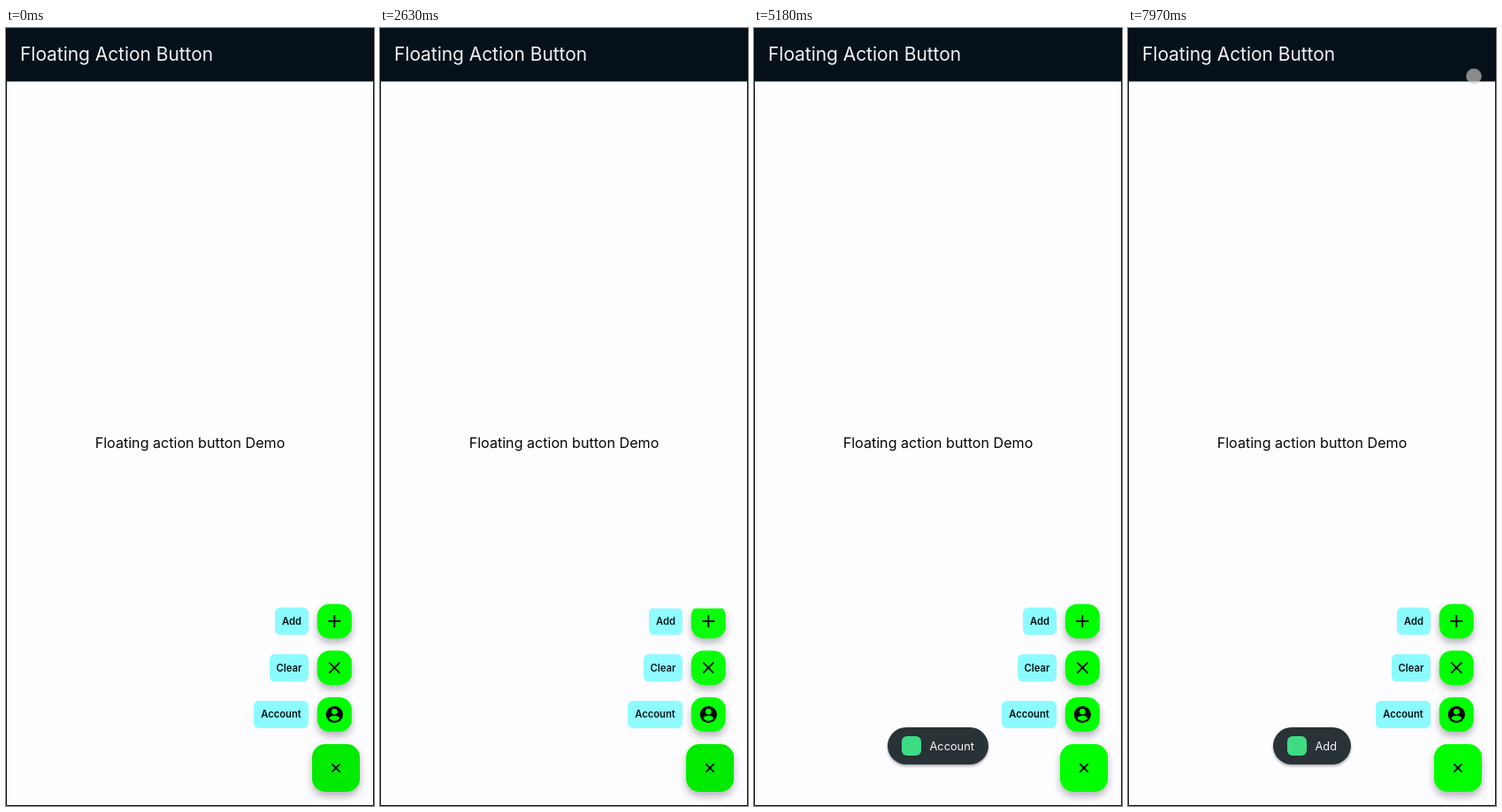
An HTML page that plays this animation: 416x880 px, repeating every 7990 ms.

```html
<!DOCTYPE html>
<html lang="en">
<head>
<meta charset="utf-8">
<title>Floating Action Button</title>
<style>
  html, body { margin: 0; width: 100%; height: 100%; overflow: hidden; background: #fdfcff; }
  svg { display: block; font-family: Inter, sans-serif; }
  .chip { fill: #8cfbff; }
  .chip-text { font-size: 11.2px; font-weight: 600; text-anchor: middle; fill: #001214; }
  .button { fill: #0f0; filter: drop-shadow(0 5px 4px rgba(50, 50, 60, .35)); }
  .line { stroke: #000; stroke-width: 1.8; fill: none; }
  .ripple { fill: #000; opacity: 0; }
  .toast-body { fill: #293237; filter: drop-shadow(0 2px 1.5px rgba(50, 50, 60, .4)); }
</style>
</head>
<body>
<svg width="416" height="880" viewBox="0 0 416 880">
  <clipPath id="reveal"><rect id="revealBox" x="0" width="416"/></clipPath>
  <rect width="416" height="880" fill="#fdfcff"/>
  <text x="208" y="475" font-size="16.1" text-anchor="middle" fill="#060608">Floating action button Demo</text>
  <rect width="416" height="60.5" fill="#07111a"/>
  <text x="16" y="37" font-size="20.9" fill="#f2f3f6">Floating Action Button</text>
  <path d="M.5 0V879.5H415.5V0" fill="none" stroke="#080c10"/>

  <g clip-path="url(#reveal)"><g id="menu"></g></g>

  <g transform="translate(373 837)">
    <rect class="button" x="-27" y="-27" width="54" height="54" rx="15"/>
    <rect class="ripple" id="rippleFab" x="-27" y="-27" width="54" height="54" rx="15"/>
    <path class="line" id="fabIcon" d="M-6.5 0H6.5M0-6.5V6.5"/>
  </g>

  <g id="toasts"></g>
  <circle id="touch" r="8.5" fill="#d6d6d6" stroke="#b0b0b0" stroke-width=".8"/>
</svg>

<script>
const LOOP = 7990;
const $ = id => document.getElementById(id);
const clamp = v => Math.min(1, Math.max(0, v));
const ramp = (t, start, length) => clamp((t - start) / length);

const icons = {
  Add: '<path class="line" d="M-7 0H7M0-7V7"/>',
  Clear: '<path class="line" d="M-6-6L6 6M6-6L-6 6"/>',
  Account: `<circle r="9.6"/><circle cy="-3.2" r="3.3" fill="#0f0"/>
    <path d="M-5.8 4Q-4.5 1.2 0 1.2T5.8 4Q3.6 7.2 0 7.2T-5.8 4Z" fill="#0f0"/>`
};

// Menu rows: name, centre y, left edge of the label chip
[['Add', 671, 304], ['Clear', 723.7, 298], ['Account', 776.5, 280]].forEach(([name, y, left]) => {
  const box = 'x="-19.5" y="-19.5" width="39" height="39" rx="14"';
  $('menu').innerHTML += `
    <rect class="chip" x="${left}" y="${y - 15.5}" width="${342 - left}" height="31" rx="6"/>
    <text class="chip-text" x="${(left + 342) / 2}" y="${y + 3.8}">${name}</text>
    <g transform="translate(371.3 ${y})">
      <rect class="button" ${box}/><rect class="ripple" id="ripple${name}" ${box}/>${icons[name]}
    </g>`;
});

const toasts = [
  { name: 'Account', half: 57, enter: 3390, exit: 5690 },
  { name: 'Add', half: 44, enter: 5960, exit: Infinity }
];
for (const { name, half } of toasts) {
  $('toasts').innerHTML += `
    <g id="toast${name}">
      <rect class="toast-body" x="${-half}" y="-21" width="${2 * half}" height="42" rx="21"/>
      <g id="content${name}">
        <rect x="${16 - half}" y="-11" width="22" height="22" rx="6" fill="#3ddc84"/>
        <text x="${47.5 - half}" y="4.6" font-size="12.8" fill="#f4f4f4">${name}</text>
      </g>
    </g>`;
}

const taps = [
  { button: 'Fab', down: -250, up: -205, x: 385, y: 825 },
  { button: 'Fab', down: 1060, up: 1103, x: 385, y: 825 },
  { button: 'Fab', down: 2320, up: 2363, x: 380, y: 829 },
  { button: 'Account', down: 3130, up: 3280, x: 375, y: 772 },
  { button: 'Add', down: 5530, up: 5640, x: 374, y: 669 },
  { down: 7870, up: 8000, x: 378, y: 54.5, dx: 13 }
];

// Critically damped spring from 0 to 1
function spring(ms, omega) {
  const x = Math.max(0, ms) / 1000 * omega;
  return 1 - (1 + x) * Math.exp(-x);
}

function bezier(x1, y1, x2, y2, x) {
  const at = (a, b, s) => 3 * (1 - s) ** 2 * s * a + 3 * (1 - s) * s * s * b + s ** 3;
  let low = 0, high = 1;
  for (let i = 0; i < 20; i++) {
    const mid = (low + high) / 2;
    if (at(x1, x2, mid) < x) low = mid; else high = mid;
  }
  return at(y1, y2, low);
}

// 1 = menu open, 0 = closed
function openness(t, omega) {
  return t < 2363 ? 1 - spring(t - 1103, omega) : spring(t - 2363, omega);
}

function drawMenu(t) {
  const open = openness(t - 8, 20);
  const height = 159 * open;
  $('menu').setAttribute('opacity', open);
  $('revealBox').setAttribute('y', 810 - height);
  $('revealBox').setAttribute('height', height);
  $('fabIcon').setAttribute('transform', `rotate(${315 * openness(t, 38.7)})`);
}

function drawToast(t, { name, enter, exit }) {
  const grow = bezier(0, 0, .2, 1, ramp(t, enter, 333));
  const shrink = bezier(.3, 0, 1, 1, ramp(t, exit, 250));
  const scale = .9 + .1 * (grow - shrink);
  $('toast' + name).setAttribute('transform', `translate(208 812) scale(${scale})`);
  $('toast' + name).setAttribute('opacity', ramp(t, enter, 66) - ramp(t, exit + 150, 100));
  $('content' + name).setAttribute('opacity', ramp(t, enter + 50, 283) - ramp(t, exit, 166));
}

function drawTaps(t) {
  const ripples = { Fab: 0, Account: 0, Add: 0 };
  let touchOpacity = 0;
  for (const { button, down, up, x, y, dx = 0 } of taps) {
    if (t < down) continue;
    if (button) ripples[button] += .08 * (ramp(t, down, 225) - ramp(t, down + 800, 150));
    const visible = 1 - ramp(t, up, 200);
    if (visible > 0) {
      touchOpacity = .62 * visible;
      $('touch').setAttribute('cx', x + dx * ramp(t, down, 100));
      $('touch').setAttribute('cy', y);
    }
  }
  $('touch').setAttribute('opacity', touchOpacity);
  for (const name in ripples) $('ripple' + name).style.opacity = ripples[name];
}

function frame() {
  const t = performance.now() % LOOP;
  drawMenu(t);
  toasts.forEach(toast => drawToast(t, toast));
  drawTaps(t);
  requestAnimationFrame(frame);
}
frame();
</script>
</body>
</html>
```
